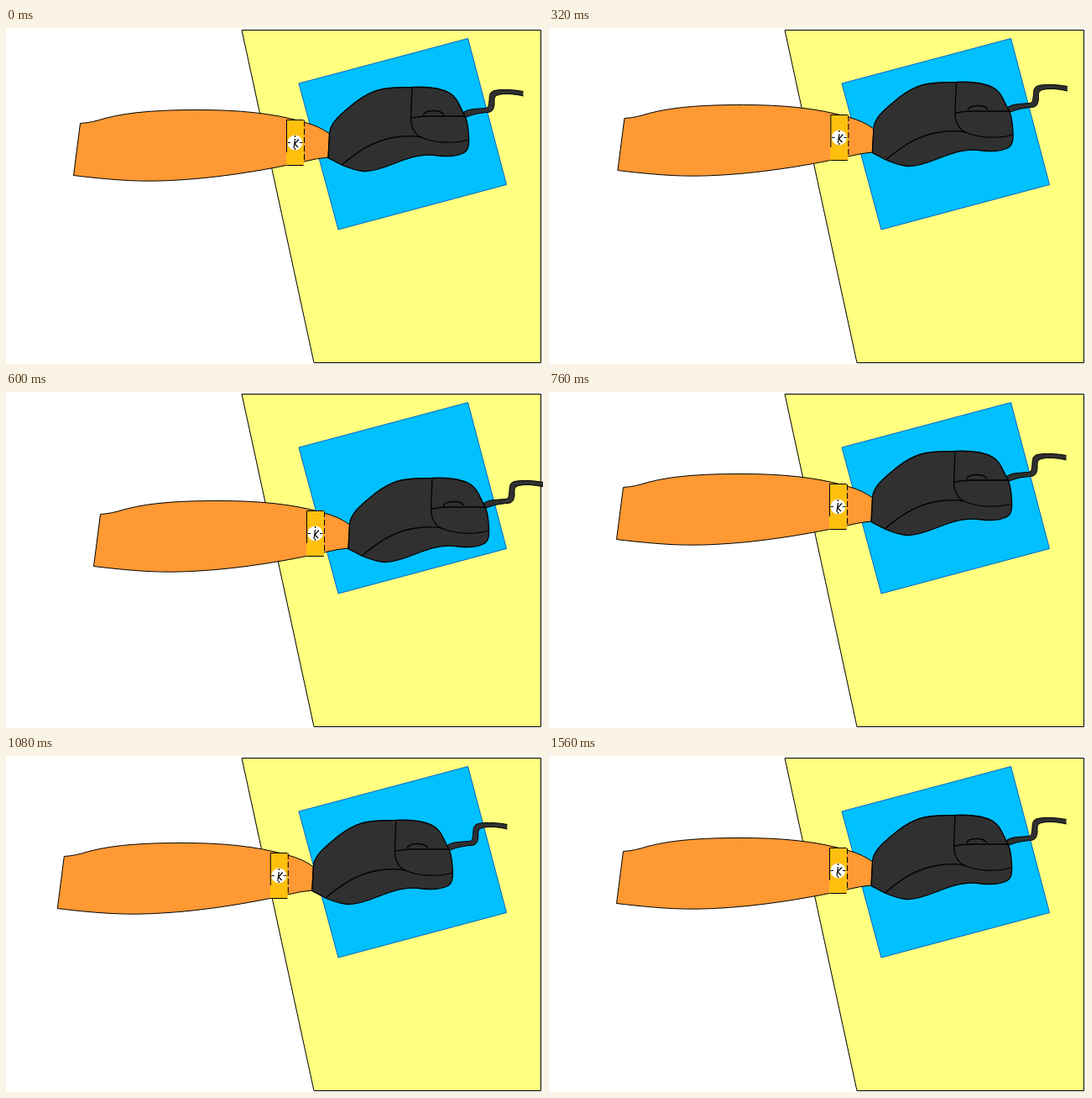
Animation, 640 px wide and 400 px high, one loop 1600 ms. Source, as an HTML page with a canvas:

```html
<!DOCTYPE html>
<html lang="en">
<head>
<meta charset="utf-8">
<title>Arm moving a mouse</title>
<style>
html, body { margin: 0; width: 100%; height: 100%; overflow: hidden; background: #fff; }
canvas { display: block; }
</style>
</head>
<body>
<canvas id="stage" width="640" height="400"></canvas>
<script>
const ctx = document.getElementById('stage').getContext('2d');
const STEP = 40;
const STEPS = 40;

// Hand positions: [step, dx, dy], joined by straight moves.
const keys = [
  [0, 0, 0], [4, 7, -30], [9, 0, 0], [14, 30, 40], [19, 0, 0],
  [24, -48, 15], [29, 0, 0], [34, 20, 0], [39, 0, 0]
];

const desk = new Path2D('M281 2.5H637.5V398.5H367Z');
const pad = new Path2D('M349 66L550.5 12.5L596.5 186.5L396 240Z');
const arm = new Path2D(
  'M88.5 113.5C98 113 107 111 118 107.5C150 99 190 97.500 230 97.500' +
  'C275 97.500 317 101 355 112Q374 117 385.500 126L384 154' +
  'Q371 155 355 159C315 168 258 178 205 181C165 183.500 135 182 80.500 175.500Z');
const cord = new Path2D(
  'M616.500 75.500C606 73.500 592 72.500 582 74.500C577 76 576 79 576 86' +
  'C575 91 576 95 571 95.500L558 96.500Q549 97 543 102L549 106' +
  'C555 103 565 101 574 100.500C579 100 581 98 582 91' +
  'C582 85 581 81 587 79.500C595 77.500 606 78.500 616.500 81');
const mouse = new Path2D(
  'M385.500 126C386 114 396 105 410 93.500C428 78 442 72 463 71' +
  'L484 70.500C503 69.500 519 72 529 77.500C538 83 540 92 545 101' +
  'C550 108 551 118 551.500 130C552 140 551 146 545 149' +
  'C538 152.500 525 153 515 152C491 148.500 475 157 461 162' +
  'C446 168 435 171 426 170.500C416 169.500 407 166 400 163L384 154.500Z');
const seams = new Path2D(
  'M484 70.500L482.500 107.500C483 120 487 127 496 130.500C510 137 535 138 551 133' +
  'M482.500 107.500Q490 105.500 500 105H547' +
  'M497.500 104C498 100 504 98.500 510 98.500C517 98.500 520 100 522 103.500' +
  'M400 163C418 148 436 135 461 130.500C476 128 488 128 496 130.500');
const strapEdges = new Path2D('M334.500 148V109.500H354.500M334.500 163.500H354.500');
const strapSide = new Path2D('M355.500 110V157');
const dial = new Path2D(
  'M335.500 136.500H339M350 136.500H353.500M344.500 128V130M344.500 143V145' +
  'M344.500 132L343 143M349 132.500L344 138L348 142');

function paint(path, fill, stroke = '#000', width = 1) {
  if (fill) {
    ctx.fillStyle = fill;
    ctx.fill(path);
  }
  ctx.strokeStyle = stroke;
  ctx.lineWidth = width;
  ctx.stroke(path);
}

function handAt(step) {
  const i = keys.findIndex(key => key[0] >= step);
  if (i === 0) return [0, 0];
  const [s0, x0, y0] = keys[i - 1];
  const [s1, x1, y1] = keys[i];
  const p = (step - s0) / (s1 - s0);
  return [x0 + (x1 - x0) * p, y0 + (y1 - y0) * p];
}

function drawWatch() {
  ctx.fillStyle = '#ffc00d';
  ctx.fillRect(334, 109, 21, 55);
  paint(strapEdges);
  ctx.setLineDash([7, 3]);
  paint(strapSide);
  ctx.setLineDash([]);

  ctx.fillStyle = '#fff';
  ctx.beginPath();
  ctx.arc(344.5, 136.5, 9, 0, Math.PI * 2);
  ctx.fill();
  paint(dial, null, '#000', 1.2);
}

function draw(now) {
  const [dx, dy] = handAt(Math.floor(now / STEP) % STEPS);
  ctx.fillStyle = '#fff';
  ctx.fillRect(0, 0, 640, 400);
  paint(desk, '#ffff80');
  paint(pad, '#00c0ff', '#0066cc');

  ctx.save();
  ctx.translate(dx, dy);
  paint(arm, '#ff9933');
  drawWatch();
  paint(cord, '#303030');
  paint(mouse, '#303030', '#000', 1.3);
  paint(seams, null, '#000', 1.3);
  ctx.restore();
}

const start = performance.now();
function tick() {
  draw(performance.now() - start);
  requestAnimationFrame(tick);
}
tick();
</script>
</body>
</html>
```
